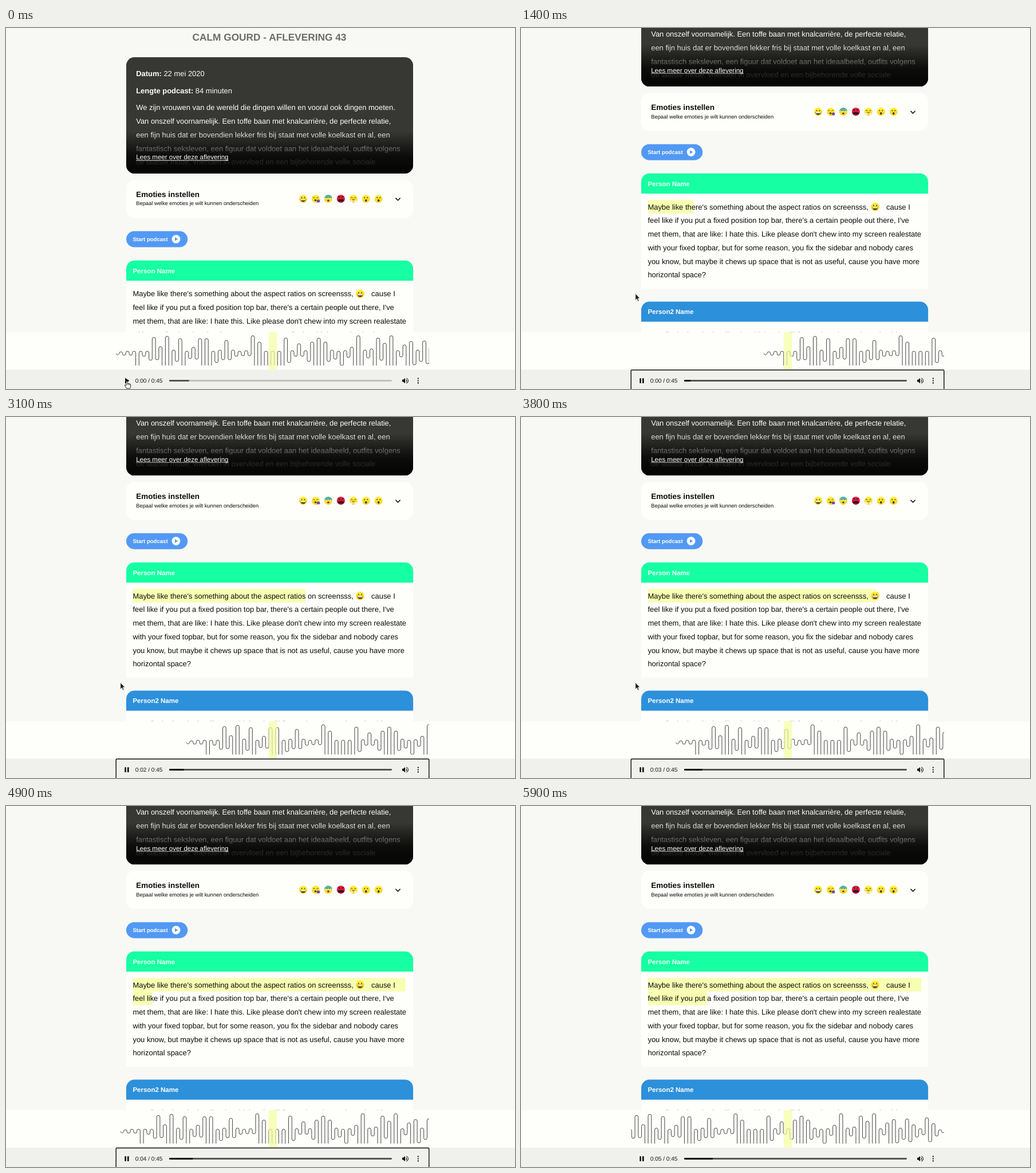
Recreate the animation shown at these times as an HTML page with a canvas. Size 889 by 630 pixels, loop 6 s.

```html
<!DOCTYPE html>
<html lang="nl">
<head>
<meta charset="utf-8">
<title>Podcast transcript</title>
<style>
html, body { margin: 0; width: 100%; height: 100%; overflow: hidden; background: #f8f9f5; }
canvas { display: block; }
</style>
</head>
<body>
<canvas id="stage" width="889" height="630"></canvas>
<script>
const ctx = document.getElementById('stage').getContext('2d');
const LOOP = 6000, STEP = 100;
const ZOOM = 0.72;
const LEFT = 210, WIDTH = 501.1, LINE = 33 * ZOOM, RADIUS = 20 * ZOOM;
const INTRO_X = 227.2, TEXT_X = 221.4;
const SCROLL = 151.9;
const PLAY_AT = 745, CURSOR_OUT = 850, CURSOR_HIDE = 4350;
const PAPER = '#fefffb', MARK = '#f7ffb2';

const INTRO = [
  'We zijn vrouwen van de wereld die dingen willen en vooral ook dingen moeten.',
  'Van onszelf voornamelijk. Een toffe baan met knalcarrière, de perfecte relatie,',
  'een fijn huis dat er bovendien lekker fris bij staat met volle koelkast en al, een',
  'fantastisch seksleven, een figuur dat voldoet aan het ideaalbeeld, outfits volgens',
  'de laatste mode, vrienden in overvloed en een bijbehorende volle sociale',
  'agenda. Waarom dat zo is en of het ook anders kan, hoor je in deze show.'
];
const SPEECH = [
  "Maybe like there's something about the aspect ratios on screensss,",
  "feel like if you put a fixed position top bar, there's a certain people out there, I've",
  "met them, that are like: I hate this. Like please don't chew into my screen realestate",
  'with your fixed topbar, but for some reason, you fix the sidebar and nobody cares',
  'you know, but maybe it chews up space that is not as useful, cause you have more',
  'horizontal space?'
];
// Alternating heights above and depths below the centre line.
const WAVE = [
  3,3, 4,3, 4,30, 4,5, 4,12, 28,11, 12,30, 30,30, 6,14, 26,30, 4,9, 11,10, 26,30,
  26,30, 4,16, 6,11, 23,11, 6,5, 4,4, 5,4, 31,30, 20,30, 4,30, 4,30, 4,30, 27,16,
  5,5, 17,5, 5,14, 20,30, 27,30, 20,14, 6,10, 4,21, 5,7, 11,24, 31,30, 6,8, 8,30,
  27,12, 18,30, 31,30, 5,6, 15,30, 21,20, 6,14, 22,18, 12,10, 5,6, 24,18, 14,8, 3,2
];

const clamp = (v, lo = 0, hi = 1) => Math.min(hi, Math.max(lo, v));
const smooth = p => p * p * (3 - 2 * p);

// Standard CSS "ease" curve.
function ease(x) {
  const bez = (a, b, u) => 3 * a * u * (1 - u) ** 2 + 3 * b * u * u * (1 - u) + u ** 3;
  let lo = 0, hi = 1;
  for (let i = 0; i < 20; i++) {
    const mid = (lo + hi) / 2;
    if (bez(0.25, 0.25, mid) < x) lo = mid; else hi = mid;
  }
  return bez(0.1, 1, hi);
}

// Font sizes are page sizes, shown at the page zoom.
function text(str, x, y, size, color = '#0c0c0c', weight = '', align = 'left') {
  ctx.font = `${weight} ${size * ZOOM}px "Liberation Sans", Arial, sans-serif`;
  ctx.textAlign = align;
  ctx.fillStyle = color;
  ctx.fillText(str, x, y);
  return ctx.measureText(str).width;
}

function rect(x, y, w, h, color, radius = 0) {
  ctx.fillStyle = color;
  ctx.beginPath();
  ctx.roundRect(x, y, w, h, radius);
  ctx.fill();
}

function oval(x, y, rx, ry, color) {
  ctx.fillStyle = color;
  ctx.beginPath();
  ctx.ellipse(x, y, rx, ry, 0, 0, 7);
  ctx.fill();
}

function poly(points, color, outline) {
  ctx.beginPath();
  points.forEach(([x, y]) => ctx.lineTo(x, y));
  ctx.closePath();
  ctx.fillStyle = color;
  ctx.fill();
  if (outline) {
    ctx.strokeStyle = outline;
    ctx.lineWidth = 0.9;
    ctx.stroke();
  }
}

function line(points, color, width) {
  ctx.beginPath();
  points.forEach(([x, y]) => ctx.lineTo(x, y));
  ctx.strokeStyle = color;
  ctx.lineWidth = width;
  ctx.stroke();
}

function emoji(kind, x, y, size = 1) {
  const ink = '#4a3512';
  ctx.save();
  ctx.translate(x, y);
  ctx.scale(size, size);
  const face = ctx.createLinearGradient(0, -7, 0, 7);
  face.addColorStop(0, kind === 'angry' ? '#ee2248' : '#fff23a');
  face.addColorStop(1, kind === 'angry' ? '#c40f3a' : '#f0d02a');
  oval(0, 0, 7.1, 7.1, face);
  if (kind === 'fear') {
    ctx.save();
    ctx.beginPath();
    ctx.rect(-8, -8, 16, 6.5);
    ctx.clip();
    oval(0, 0, 7.1, 7.1, '#4fb5ad');
    ctx.restore();
  }
  const closed = kind === 'yawn' || kind === 'huff';
  for (const side of [-1, 1]) {
    if (closed) line([[side * 4.5, -2.6], [side * 1.5, -1.4]], ink, 0.9);
    else {
      if (kind === 'fear') oval(side * 2.6, -1.6, 1.5, 1.6, '#fff');
      oval(side * 2.5, -2, 0.8, 1.2, ink);
    }
  }
  if (kind === 'grin') {
    ctx.fillStyle = ink;
    ctx.beginPath();
    ctx.arc(0, 0.8, 4.6, 0, Math.PI);
    ctx.fill();
    rect(-3.9, 0.9, 7.8, 1.7, '#fff');
  } else if (kind === 'yawn') {
    oval(-0.5, 2.6, 1.8, 1.5, ink);
    oval(4.6, 4, 2.9, 2.5, '#684797');
    line([[3, 6], [6.8, 2.6]], '#8d6bb8', 0.8);
  } else if (kind === 'angry') {
    rect(-4.8, 1, 9.6, 3.7, '#25141a', 1);
    line([[-5, -4.5], [-1, -2.9]], '#3c1118', 1.1);
    line([[5, -4.5], [1, -2.9]], '#3c1118', 1.1);
  } else if (kind === 'huff') {
    line([[-2.4, 2], [0, 1.2], [2.4, 2]], ink, 0.9);
    oval(-4.2, 4.4, 3, 1.9, '#f4f0dc');
    oval(4.2, 4.4, 3, 1.9, '#f4f0dc');
  } else oval(0, 3, 1.8, kind === 'fear' ? 1.5 : 2.1, ink);
  ctx.restore();
}

function introCard() {
  ctx.save();
  ctx.beginPath();
  ctx.roundRect(LEFT, 51, WIDTH, 203, RADIUS);
  ctx.clip();
  rect(LEFT, 51, WIDTH, 203, '#373733');
  const white = '#fdfefa';
  for (const [label, value, y] of [['Datum:', '22 mei 2020', 84], ['Lengte podcast:', '84 minuten', 113.7]]) {
    const w = text(label, INTRO_X, y, 18, white, 'bold');
    text(value, INTRO_X + w + 3.6, y, 18, white);
  }
  INTRO.forEach((str, i) => text(str, INTRO_X, 143.3 + i * LINE, 18, white));
  const shade = ctx.createLinearGradient(0, 180, 0, 256);
  [[0, 0], [0.4, 0.56], [0.58, 0.79], [1, 0.94]].forEach(([at, alpha]) =>
    shade.addColorStop(at, `rgba(0,0,0,${alpha})`));
  rect(LEFT, 180, WIDTH, 75, shade);
  const w = text('Lees meer over deze aflevering', INTRO_X, 229.4, 16, white);
  rect(INTRO_X, 230.6, w, 0.8, white);
  ctx.restore();
}

function emotionCard() {
  rect(LEFT, 265.2, WIDTH, 66.4, PAPER, RADIUS);
  text('Emoties instellen', INTRO_X, 295, 18.72, '#0a0a0a', 'bold');
  text('Bepaal welke emoties je wilt kunnen onderscheiden', INTRO_X, 309.4, 13);
  ['grin', 'yawn', 'fear', 'angry', 'huff', 'open', 'shock']
    .forEach((kind, i) => emoji(kind, 519 + i * 21.95, 298));
  line([[680.4, 296.6], [684.5, 300.7], [688.6, 296.6]], '#111', 1.6);
}

function startButton() {
  rect(LEFT, 354.6, 107.2, 28, '#5299f4', 14);
  text('Start podcast', TEXT_X, 372, 13.333, '#fdfefa', 'bold');
  oval(297, 368.4, 7.4, 7.4, '#fdfefa');
  poly([[295, 365.2], [295, 371.6], [300.2, 368.4]], '#5299f4');
}

function cardHeader(name, y, color, ink) {
  rect(LEFT, y, WIDTH, 35.3, color, [RADIUS, RADIUS, 0, 0]);
  text(name, TEXT_X, y + 21.8, 16, ink, 'bold');
}

function highlight(t) {
  const full = 477.8, top = 451.8, sec = (t - PLAY_AT) / 1000;
  if (sec <= 0) return;
  const first = t < 4390
    ? 120 * sec + 3.4 * sec * sec
    : full * ease(clamp((t - 4390) / 550));
  rect(TEXT_X, top, Math.min(full, first), LINE, MARK);
  if (t > 4420) rect(TEXT_X, top + LINE, (t - 4420) * 0.0703, LINE, MARK);
}

function speechCards(t) {
  cardHeader('Person Name', 405.7, '#16ffa2', '#ecfff6');
  rect(LEFT, 441, WIDTH, 166, PAPER);
  highlight(t);
  SPEECH.forEach((str, i) => text(str, TEXT_X, 468.4 + i * LINE, 18));
  emoji('grin', 618.5, 463.8, 1.05);
  text('cause I', 638, 468.4, 18);

  cardHeader('Person2 Name', 629.4, '#2d90db', '#fdfefa');
  rect(LEFT, 664.7, WIDTH, 166, PAPER);
  text("Let's fix the header but like the sidebar, it still fits on the edge and we should", TEXT_X, 692, 18);
}

function wave(x0) {
  const gap = 8 * ZOOM, r = gap / 2, mid = 568;
  ctx.save();
  ctx.beginPath();
  ctx.rect(192, 531, 547, 58);
  ctx.clip();
  ctx.beginPath();
  ctx.moveTo(x0, mid);
  ctx.quadraticCurveTo(x0 + r, mid + 5, x0 + gap, mid);
  WAVE.forEach((amp, i) => {
    const ry = Math.min(r, amp), up = i % 2 === 0;
    const cy = mid + (up ? ry - amp : amp - ry);
    ctx.ellipse(x0 + gap * (i + 1.5), cy, r, ry, 0, Math.PI, up ? 2 * Math.PI : 0, !up);
  });
  ctx.strokeStyle = '#444';
  ctx.lineWidth = 1;
  ctx.stroke();
  ctx.restore();
}

function player(t) {
  const playing = t > PLAY_AT, sec = Math.max(0, (t - PLAY_AT) / 1000);
  rect(0, 531, 889, 65.2, PAPER);
  wave(playing ? 466.1 - 64.1 * sec : 192);
  rect(458.8, 531, 14.4, 65.2, 'rgba(246,255,160,.7)');

  rect(0, 596.2, 889, 34, '#f0f1ed');
  if (t >= 200 && t < 5800) {
    ctx.lineWidth = 2 * ZOOM;
    ctx.strokeStyle = '#101010';
    ctx.beginPath();
    ctx.roundRect(192.2, 596.7, 546.6, 42, 1.5);
    ctx.stroke();
  }
  const ink = '#0a0a0a';
  if (playing) {
    rect(207.3, 611.3, 2.6, 8.6, ink);
    rect(212, 611.3, 2.6, 8.6, ink);
  } else poly([[208, 610.8], [208, 620.4], [215.4, 615.6]], ink);
  text(`0:0${Math.floor(sec)} / 0:45`, 225.8, 619.1, 14, '#1a1a1a');

  const bar = (w, color) => rect(285, 614.1, w, 2.9, color, 1.45);
  bar(389, playing ? '#555552' : '#c0c1be');
  bar(playing ? 5.6 + 8.64 * sec : 35, playing ? '#000' : '#555552');

  poly([[692, 613.8], [694, 613.8], [697, 611], [697, 620.2], [694, 617.4], [692, 617.4]], ink);
  ctx.strokeStyle = ink;
  ctx.lineWidth = 1.1;
  for (const r of [2, 4.6]) {
    ctx.beginPath();
    ctx.arc(697.8, 615.6, r, -1.25, 1.25);
    ctx.stroke();
  }
  for (const y of [611.7, 615.6, 619.5]) oval(719.8, y, 1.15, 1.15, ink);
}

function cursor(t) {
  if (t > CURSOR_HIDE) return;
  const p = smooth(clamp((t - CURSOR_OUT) / 450));
  const x = 211 - 11.2 * p, y = 616 - 152.5 * p;
  const shape = (points, fill, edge) =>
    poly(points.map(([dx, dy]) => [x + dx, y + dy]), fill, edge);
  if (y > 596) {
    shape([[-1, 1], [0, 0], [1.2, 1], [1.3, 4.5], [3.2, 4.4], [5, 5], [6.6, 5.8], [6.8, 9], [5.6, 13],
      [-0.2, 13], [-2.6, 9.5], [-3.8, 7.4], [-2.8, 6.6], [-1, 8.2]], '#fff', '#111');
    for (const dx of [1.3, 3.2, 5]) line([[x + dx, y + 5], [x + dx, y + 7.4]], '#111', 0.7);
  } else {
    shape([[0, 0], [0, 11.6], [2.6, 9.2], [4.5, 13.4], [6.4, 12.5], [4.5, 8.4], [8, 8.2]], '#1c1c1c', '#eee');
  }
}

function draw(t) {
  ctx.textRendering = 'geometricPrecision';
  rect(0, 0, 889, 630, '#f8f9f5');
  ctx.save();
  ctx.translate(0, -SCROLL * smooth(clamp((t - 150) / 500)));
  text('CALM GOURD - AFLEVERING 43', 460, 22.2, 24, '#6c6c6a', 'bold', 'center');
  introCard();
  emotionCard();
  startButton();
  speechCards(t);
  ctx.restore();
  player(t);
  cursor(t);
}

const start = performance.now();
function tick() {
  const t = (performance.now() - start) % LOOP;
  draw(Math.floor(t / STEP) * STEP);
  requestAnimationFrame(tick);
}
tick();
</script>
</body>
</html>
```
